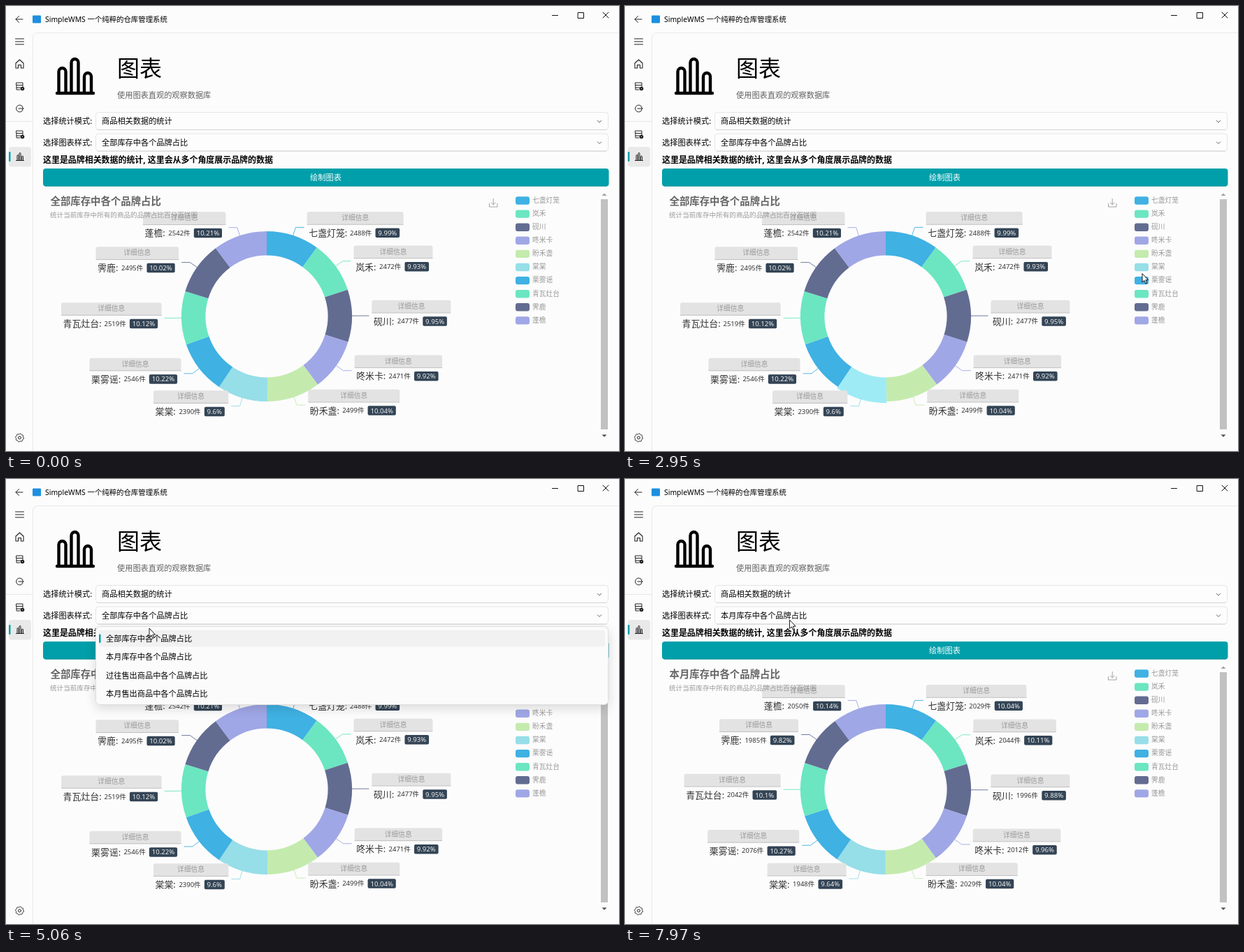
Animation, 877 px wide and 638 px high, one loop 8 s. Source, as an HTML page with a canvas:

```html
<!DOCTYPE html>
<html lang="zh-CN">
<head>
<meta charset="utf-8">
<style>
html, body { margin: 0; width: 100%; height: 100%; overflow: hidden; background: #fcfcfc; }
canvas { display: block; }
</style>
</head>
<body>
<canvas id="stage" width="877" height="638"></canvas>
<script>
const c = document.getElementById('stage').getContext('2d');
const LOOP = 8000, TEAL = '#009faa';
const DRAW = 6004;                    // second chart starts to unfold
const OPEN = 4780, CLOSE = 5450;      // style menu
const CX = 373, CY = 445, R = 122, R0 = 87.5, ELBOW = 134.2;

const names = ['七盏灯笼', '岚禾', '砚川', '咚米卡', '盼禾盏', '棠棠', '栗雾谣', '青瓦灶台', '霁鹿', '蓬檐'];
const colors = ['#3fb1e3', '#6be6c1', '#626c91', '#a0a7e6', '#c4ebad', '#96dee8'];
const total = [2488, 2472, 2477, 2471, 2499, 2390, 2546, 2519, 2495, 2542];
const month = [2029, 2044, 1996, 2012, 2029, 1948, 2076, 2042, 1985, 2050];
const styles = ['全部库存中各个品牌占比', '本月库存中各个品牌占比', '过往售出商品中各个品牌占比', '本月售出商品中各个品牌占比'];

// [item, hidden at, shown again at]
const toggles = [[5, 1530, 1950], [6, 3236, 3800]];
// [item, from, to]
const hovers = [[6, 980, 1030], [5, 1030, 1070], [4, 1070, 1110], [5, 1130, 1530],
  [5, 2150, 2900], [6, 3080, 3236], [6, 3950, 4300]];
// [time, x, y]
const mouse = [[490, 566, 597], [700, 648, 534], [860, 705, 468], [990, 754, 395], [1090, 747, 351],
  [1180, 739, 373], [2850, 739, 373], [3050, 741, 394], [4200, 741, 394], [4380, 690, 376],
  [4680, 204, 201], [4880, 204, 203], [5030, 205, 214], [5110, 205, 214], [5350, 246, 251],
  [5720, 246, 251], [5880, 248, 245], [7820, 248, 245], [7960, 235.5, 202]];

const clamp = x => Math.max(0, Math.min(1, x));
const lerp = (a, b, p) => a + (b - a) * p;
const inOut = x => (x = clamp(x)) < .5 ? 4 * x ** 3 : 1 - 4 * (1 - x) ** 3;
const out = x => 1 - (1 - clamp(x)) ** 3;
const colorOf = i => colors[i % 6 + (i > 5 ? 0 : 0)];

function text(s, x, y, size, color = '#000', bold = false, align = 'left') {
  c.font = `${bold ? 'bold ' : ''}${size}px "Noto Sans","Noto Sans CJK SC",sans-serif`;
  c.textAlign = align;
  c.fillStyle = color;
  c.fillText(s, x, y + size * .37);
}

function box(x, y, w, h, r, fill, stroke) {
  c.beginPath();
  c.roundRect(x, y, w, h, r);
  if (fill) { c.fillStyle = fill; c.fill(); }
  if (stroke) { c.strokeStyle = stroke; c.lineWidth = 1; c.stroke(); }
}

function line(d, color = '#222', width = 1) {
  c.strokeStyle = color;
  c.lineWidth = width;
  c.stroke(new Path2D(d));
}

function fill(d, color) {
  c.fillStyle = color;
  c.fill(new Path2D(d));
}

function gear(x, y, r) {
  c.beginPath();
  for (let i = 0; i <= 64; i++) {
    const a = i / 64 * 2 * Math.PI, d = r + Math.sin(a * 8) * r * .1;
    c.lineTo(x + d * Math.cos(a), y + d * Math.sin(a));
  }
  c.strokeStyle = '#222';
  c.lineWidth = 1;
  c.stroke();
  c.beginPath();
  c.arc(x, y, r * .35, 0, 7);
  c.stroke();
}

function stack(x, y) {
  line(`M${x - 5} ${y - 5}h9v3.5h-9zM${x + 1} ${y + 2}h-6v-3.5h9v2M${x - 5} ${y + 2}v3h5`);
  c.beginPath();
  c.arc(x + 3.5, y + 3.5, 2.8, 0, 7);
  c.fillStyle = '#222';
  c.fill();
  box(x + 3, y + 3, 1, 1, 0, '#fff');
}

function frame() {
  c.fillStyle = '#fcfcfc';
  c.fillRect(0, 0, 877, 638);
  c.lineCap = c.lineJoin = 'round';
  line('M38.5 638V46Q38.5 38.5 46 38.5H877', '#e9e9e9');
  line('M14 19h10M18.5 14.5L14 19l4.5 4.5');
  box(38, 13.5, 12, 11, 1, '#1c8fe0');
  text('SimpleWMS 一个纯粹的仓库管理系统', 56, 19, 10.4);
  line('M781.5 13.5h8M818.5 9.5h8v8h-8zM854 9l8 8M862 9l-8 8', '#111');

  line('M13.5 47h12M13.5 51h12M13.5 55h12');
  line('M14 82l5.5-5 5.5 5v7h-3.5v-4.5h-4v4.5H14z', '#222', 1.1);
  stack(20, 115);
  line('M24 144.5a5 5 0 1 0 0 5M18 147h7M23 145l2 2-2 2');
  line('M0 165.5h38', '#e6e6e6');
  stack(20, 184);
  box(4, 202, 32, 28.5, 4, '#e9e9e9');
  box(4, 209, 2.5, 14, 1.2, TEAL);
  line('M14.5 221.5h11M16 221v-6.5q0-1 1-1t1 1v6.5M19 221v-9.5q0-1 1-1t1 1v9.5M22.5 221v-5q0-1 1-1t1 1v5');
  gear(19.5, 619, 5.5);

  line('M73 125h52M75.500 124V94a5 5 0 0 1 10 0v30M93.500 124V81a5 5 0 0 1 10 0v43M112 124v-23a5 5 0 0 1 10 0v23', '#000', 4.4);
  text('图表', 159, 89, 32);
  text('使用图表直观的观察数据库', 159, 128, 11.2, '#606060');
}

function combo(label, value, y) {
  text(label, 53, y, 11.2);
  box(128.5, y - 12.5, 733, 25, 4, '#fdfdfd', '#e6e6e6');
  line(`M131 ${y + 12.5}h728`, '#d2d2d2');
  text(value, 137, y, 11.2);
  line(`M846 ${y - 1}l3 3 3-3`, '#666');
}

function form(t) {
  combo('选择统计模式:', '商品相关数据的统计', 165);
  combo('选择图表样式:', styles[t < CLOSE ? 0 : 1], 195.5);
  text('这里是品牌相关数据的统计, 这里会从多个角度展示品牌的数据', 53, 221, 11.95, '#000', true);
  const pressed = t > 5740 && t < 5890, hover = t > CLOSE + 40 && t < 7870;
  box(53, 233, 809.5, 25.5, 4, pressed ? '#3eabb3' : hover ? '#00a7b3' : TEAL);
  line('M56 258.2h804', '#00848e', .6);
  text('绘制图表', 457.5, 246, 11.2, '#fff', false, 'center');
}

// start and end angle of each item, clockwise from the top
function layout(values) {
  const k = 2 * Math.PI / values.reduce((a, b) => a + b);
  let sum = 0;
  return values.map(v => [sum * k, (sum += v) * k]);
}

// percentages with two digits that add up to exactly 100
function percents(values) {
  const sum = values.reduce((a, b) => a + b);
  const exact = values.map(v => v / sum * 1e4), seats = exact.map(Math.floor);
  const order = exact.map((v, i) => i).sort((a, b) => exact[b] - seats[b] - exact[a] + seats[a]);
  const left = 1e4 - seats.reduce((a, b) => a + b);
  order.slice(0, left).forEach(i => seats[i]++);
  return seats.map(s => s / 100 + '%');
}

function sector(i, a, b, lift, alpha) {
  const q = Math.PI / 2;
  c.globalAlpha = alpha;
  c.beginPath();
  c.arc(CX, CY, R + 4 * lift, a - q, b - q);
  c.arc(CX, CY, R0, b - q, a - q, true);
  c.fillStyle = colorOf(i);
  if (lift > 0) {
    const rgb = colorOf(i).match(/\w\w/g).map(h => Math.min(255, parseInt(h, 16) * (1 + .1 * lift)));
    c.fillStyle = `rgb(${rgb})`;
  }
  c.fill();
  c.globalAlpha = 1;
}

function callout(i, mid, y, value, percent, grow) {
  const right = mid < Math.PI, dir = right ? 1 : -1;
  const sin = Math.sin(mid), ex = CX + ELBOW * sin;
  c.lineCap = 'butt';
  if (grow < 1) c.setLineDash([40 * grow, 99]);
  line(`M${CX + R * sin} ${CY - R * Math.cos(mid)}L${ex} ${y}h${12.2 * dir}`, colorOf(i), .9);
  c.setLineDash([]);

  const w = 12.5 * names[i].length + 5.6 * percent.length + 60;
  const x = ex + 16.2 * dir - (right ? 0 : w), top = y - 22.3;
  const pw = 5.6 * percent.length + 6.6, px = x + w - 5.5 - pw;
  c.globalAlpha = grow;
  box(x, top, w, 18, [3, 3, 0, 0], '#e3e3e3');
  line(`M${x} ${top + 18.2}h${w}`, '#aaa', .7);
  text('详细信息', x + w / 2, top + 8.5, 9.75, '#999', false, 'center');
  text(names[i] + ':', x + 2.6, top + 30.3, 12.9, '#333');
  text(value + '件', px - 5.2, top + 30, 9.5, '#333', false, 'right');
  box(px, top + 23.5, pw, 13.5, 2, '#334455');
  text(percent, px + pw / 2, top + 30.2, 9.6, '#eee', false, 'center');
  c.globalAlpha = 1;
}

function pie(t) {
  const second = t >= DRAW, values = second ? month : total;
  const unfold = second ? inOut((t - DRAW) / 1000) : 1;
  const last = second ? null : toggles.filter(g => t >= g[1]).pop();
  const full = layout(values);
  let shown = values, angles = full, gone = -1, added = -1, grow = 1;
  if (last) {
    const [item, hide, show] = last;
    const less = values.map((v, i) => i === item ? 0 : v), lean = layout(less);
    const back = t >= show;
    const p = back ? 1 - inOut((t - show - 250) / 500) : inOut((t - hide) / 500);
    angles = full.map((f, i) => f.map((a, k) => lerp(a, lean[i][k], p)));
    if (back) {
      added = item;
      grow = inOut((t - show) / 500);
      if (p > 0) angles[item] = full[item];
    } else {
      gone = item;
      shown = less;
      angles[item] = full[item];
    }
  }
  const lift = i => clamp(hovers.reduce((s, [k, a, b]) =>
    k === i ? s + out((t - a) / 300) - out((t - b) / 300) : s, 0));
  const order = names.map((n, i) => i).sort((a, b) => (a === added) - (b === added));
  for (const i of order) {
    const [a, b] = angles[i].map(v => v * unfold);
    if (i === gone) sector(i, a, b, 0, clamp(1 - (t - last[1]) / 200));
    else sector(i, a, i === added ? lerp(a, b, grow) : b, lift(i), 1);
  }
  const labels = percents(shown);
  let above = 0;
  for (const i of order) {
    if (i === gone) continue;
    const mid = (angles[i][0] + angles[i][1]) / 2;
    let y = CY - ELBOW * Math.cos(mid);
    if (mid < Math.PI) above = y = Math.max(y, above + 39);
    callout(i, mid, y, values[i], labels[i], i === added ? grow : unfold);
  }
  return gone;
}

function chart(t) {
  const gone = pie(t);
  text(styles[t < DRAW ? 0 : 1], 63.5, 280, 14.4, '#666', true);
  text('统计当前库存中所有的商品的品牌占比百分百饼图', 63, 299.5, 9.6, '#999');
  line('M691.500 283v5h11.500v-5M697.200 276v9M694 281.500l3.200 3.500 3.200-3.500', '#999', .9);
  names.forEach((n, i) => {
    const y = 279 + 19.1 * i;
    box(729, y - 5.7, 20, 11.4, 3, i === gone ? '#ccc' : colorOf(i));
    text(n, 753, y - .8, 9.75, i === gone ? '#ccc' : '#999');
  });
  box(851, 277, 10, 330, 0, '#c1c1c1');
  fill('M852.500 272h7l-3.500-3.500z', '#a3a3a3');
  fill('M852.500 614.500h7l-3.500 3.500z', '#505050');
}

function menu(t, mouseY) {
  if (t < OPEN || t >= CLOSE) return;
  const p = out((t - OPEN) / 250);
  c.save();
  c.beginPath();
  c.rect(100, 208, 777, 150 * p);
  c.clip();
  c.shadowColor = 'rgba(0,0,0,.14)';
  c.shadowBlur = 16;
  c.shadowOffsetY = 5;
  box(128, 211.5, 734, 112, 6, '#fbfbfb');
  c.shadowColor = 'transparent';
  box(128.5, 211.5, 733, 112, 6, null, '#dedede');
  styles.forEach((s, i) => {
    const y = 229 + 26.3 * i;
    if (i === 0 || Math.abs(mouseY - y) < 12) box(133, y - 12, 724, 23.5, 4, '#f1f1f1');
    text(s, 143, y, 11.2);
  });
  box(133, 222.5, 2.5, 12.5, 1.2, TEAL);
  c.restore();
}

function pointer(t) {
  let k = mouse.findIndex(m => m[0] > t);
  if (k === 0) return null;
  if (k < 0) return mouse[mouse.length - 1].slice(1);
  const [t0, x0, y0] = mouse[k - 1], [t1, x1, y1] = mouse[k];
  const p = (t - t0) / (t1 - t0);
  return [lerp(x0, x1, p), lerp(y0, y1, p)];
}

function arrow([x, y]) {
  const d = `M${x} ${y}v12.500l2.900-2.600 2 4.500 1.900-.8-2-4.400h3.800z`;
  fill(d, '#fff');
  line(d, '#000', .9);
}

function draw(now) {
  const t = now % LOOP, at = pointer(t);
  frame();
  chart(t);
  form(t);
  menu(t, at ? at[1] : 0);
  if (at) arrow(at);
  requestAnimationFrame(draw);
}
requestAnimationFrame(draw);
</script>
</body>
</html>
```
